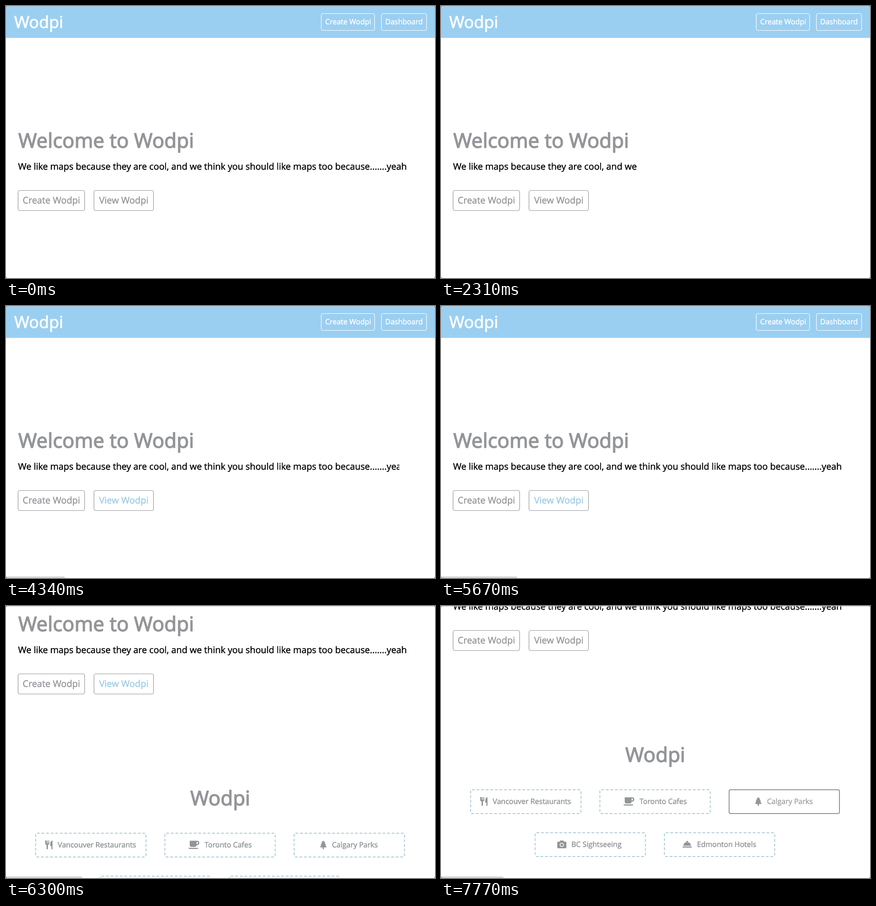
An HTML page for the animation above (8 s loop, 941x595 px).

```html
<!DOCTYPE html>
<html lang="en">
<head>
<meta charset="utf-8">
<title>Wodpi</title>
<style>
  html, body { margin: 0; width: 100%; height: 100%; overflow: hidden; background: #fff; }
  svg { display: block; width: 941px; height: 595px; }
  text {
    font-family: "Open Sans", "Noto Sans", sans-serif;
    text-rendering: geometricPrecision;
    fill: var(--ink); stroke: var(--ink); stroke-width: .45; stroke-linejoin: round;
  }
  rect { fill: none; stroke-width: 1.2; }
  svg { --ink: #939598; }
  .middle { text-anchor: middle; }
  .title { font-size: 44px; stroke-width: 1.5; }
  .nav { --ink: #fff; font-size: 16px; }
  .nav rect { stroke: #fff; }
  .logo { font-size: 36px; stroke-width: .9; }
  .tagline { --ink: #000; font-size: 19.8px; }
  .button { font-size: 20px; }
  .button rect { stroke: #939598; }
  .button.hover { --ink: #9dcbe3; }
  .card { --ink: #8f9194; font-size: 16px; }
  .card rect { stroke: #adcdd8; stroke-width: 2; stroke-dasharray: 6 4.05; }
  .card path { fill: #939598; fill-rule: evenodd; }
  .card.hover { --ink: #9fa1a4; }
  .card.hover rect { stroke: #939598; stroke-dasharray: none; }
</style>
</head>
<body>
<svg viewBox="0 0 941 595">
  <clipPath id="reveal"><rect id="revealBox" x="26" y="330" height="45"/></clipPath>
  <g id="page">
    <path fill="#9bcff1" d="M0 0h941v69H0z"/>
    <path fill="#c6cfd5" d="M0 69h941v1H0z"/>
    <g class="nav">
      <text class="logo" x="18" y="48">Wodpi</text>
      <rect x="691.5" y="16.5" width="117" height="37" rx="4"/>
      <text class="middle" x="750.5" y="40">Create Wodpi</text>
      <rect x="823.5" y="16.5" width="99" height="37" rx="4"/>
      <text class="middle" x="873" y="40">Dashboard</text>
    </g>
    <text class="title" x="27" y="310">Welcome to Wodpi</text>
    <text class="tagline" x="26.5" y="358" clip-path="url(#reveal)">We like maps because they are cool, and we think you should like maps too because.......yeah</text>
    <g class="button" id="create">
      <rect x="26.5" y="403.5" width="146" height="44" rx="4"/>
      <text class="middle" x="99.5" y="432">Create Wodpi</text>
    </g>
    <g class="button" id="view">
      <rect x="193" y="403.5" width="130.5" height="44" rx="4"/>
      <text class="middle" x="258.3" y="432">View Wodpi</text>
    </g>
    <g id="maps" transform="translate(0 350)">
      <text class="title middle" x="470" y="341">Wodpi</text>
    </g>
  </g>
  <path id="status" fill="#dddee2" stroke="#bcbcc0"/>
  <path fill="#c7c7c7" d="M0 0h941v1H0z"/>
  <path fill="#555" d="M0 0h2l-2 2zM941 0h-2l2 2zM0 593v2h2zM941 593v2h-2z"/>
</svg>
<script>
const LOOP = 8000, TICK = 70, SCROLL = 350;
const byId = id => document.getElementById(id);

const icons = {
  utensils: 'M86 418v6q0 3 3 3.5V437h3v-9.5q3-.5 3-3.5v-6h-1.5v6h-1.2v-6h-1.6v6h-1.2v-6zM102 418q-5 1-5 8v4h2.5v7h2.5z',
  cup: 'M400 434h22q-1 2.5-3 2.5h-16q-2 0-3-2.5zM403 418.5h16q5 0 5 4.5t-5 5h-1q0 4-4 4h-7q-4 0-4-4zM418 421v4.5h1q2.2 0 2.2-2.3t-2.2-2.2z',
  tree: 'M696 418l4.5 5h-1.8l3.6 4.5h-2l3.2 5.5h-6v4h-3v-4h-6l3.2-5.5h-2l3.6-4.5h-1.8z',
  camera: 'M257 515.5h3.5l1.2-2.5h6.6l1.2 2.5h3.5q2 0 2 2V528q0 2-2 2h-16q-2 0-2-2v-10.5q0-2 2-2zM260.5 522.5a4.5 4.5 0 0 0 9 0a4.5 4.5 0 0 0-9 0zM262 522.5a3 3 0 0 0 6 0a3 3 0 0 0-6 0z',
  bell: 'M530 526h20v2.5h-20zM531.5 524.5a8.5 8 0 0 1 17 0zM538 514h4v3h-4z'
};

function addCard(id, x, y, textX, label, icon) {
  byId('maps').insertAdjacentHTML('beforeend', `<g class="card" id="${id}">
    <rect x="${x + 1}" y="${y + 1}" width="242" height="52" rx="3"/>
    <path d="${icon}"/><text x="${textX}" y="${y + 32}">${label}</text></g>`);
}
addCard('vancouver', 64, 401, 113.5, 'Vancouver Restaurants', icons.utensils);
addCard('toronto', 347.5, 401, 435.5, 'Toronto Cafes', icons.cup);
addCard('calgary', 631, 401, 715, 'Calgary Parks', icons.tree);
addCard('sights', 205.5, 495, 286, 'BC Sightseeing', icons.camera);
addCard('hotels', 489, 495, 561.5, 'Edmonton Hotels', icons.bell);

// [start time, value], in order of time
const hovers = [[0, ''], [2870, 'create'], [3850, 'view'], [6440, 'vancouver'],
  [6860, ''], [7070, 'toronto'], [7700, ''], [7770, 'calgary']];
const statusWidths = [[0, 0], [2870, 130], [5040, 168], [6440, 135], [7070, 138]];

const valueAt = (steps, t) => steps.filter(([start]) => start <= t).pop()[1];
const progress = (t, start, duration) => Math.min(1, Math.max(0, (t - start) / duration));

function render(t) {
  const typed = t < 400 ? 1 : progress(t, 400, 4025);
  byId('revealBox').setAttribute('width', typed < 1 ? 1 + 854 * typed : 915);

  const eased = (1 - Math.cos(Math.PI * progress(t, 6039, 401))) / 2;
  byId('page').setAttribute('transform', `translate(0 ${-Math.round(SCROLL * eased)})`);

  const hovered = valueAt(hovers, t);
  for (const el of document.querySelectorAll('.button, .card'))
    el.classList.toggle('hover', el.id === hovered);

  const width = valueAt(statusWidths, t);
  byId('status').setAttribute('d', width ? `M-1 592.5H${width - 4}q3 0 3.5 4H-1z` : '');
}

function frame() {
  const t = performance.now() % LOOP;
  render(t - t % TICK);
  requestAnimationFrame(frame);
}
frame();
</script>
</body>
</html>
```
